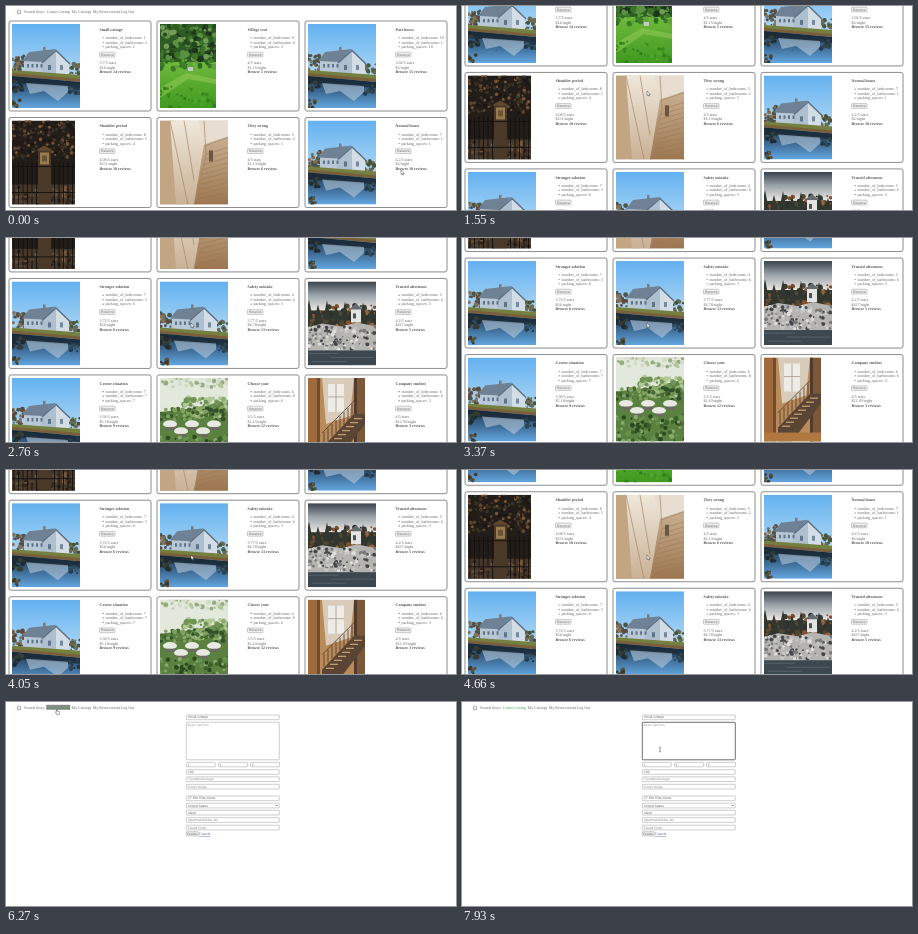
Recreate the animation shown at these times as an HTML page. Size 450 by 204 pixels, loop 8000 ms.

```html
<!DOCTYPE html>
<html lang="en">
<head>
<meta charset="utf-8">
<title>Stays</title>
<style>
  html, body { margin: 0; height: 100%; overflow: hidden; background: #fff; }
  svg { display: block; }
  #stage { width: 100vw; height: 100vh; }
  text { font: 4.08px "Liberation Serif", serif; fill: #666; text-rendering: geometricPrecision; }
  .bold { font-weight: bold; font-size: 4px; fill: #505050; }
  .ui { font: 3.33px "Liberation Sans", sans-serif; }
  .mono { font: 3.2px "Liberation Mono", monospace; }
  .hint { fill: #888; }
  .link { fill: #5a5ab4; text-decoration: underline; }
  .current { fill: #3fa84e; }
  .field { fill: #fff; stroke: #909090; stroke-width: .45; }
  .focused { stroke: #333; stroke-width: .7; }
  .button { fill: #eee; stroke: #888; stroke-width: .4; }
  .card { fill: #fff; stroke: #666; stroke-width: .75; }
</style>
</head>
<body>
<svg id="stage" viewBox="0 0 450 204">
  <defs>
    <linearGradient id="sky" x2="0" y2="1"><stop stop-color="#63b1f0"/><stop offset="1" stop-color="#b4dbf5"/></linearGradient>
    <linearGradient id="pond" x2="0" y2="1"><stop stop-color="#1f3448"/><stop offset=".5" stop-color="#3d6a93"/><stop offset="1" stop-color="#62a6e0"/></linearGradient>
    <linearGradient id="dusk" x2="0" y2="1"><stop stop-color="#39414a"/><stop offset=".45" stop-color="#98a2a9"/><stop offset="1" stop-color="#f2ece8"/></linearGradient>
    <linearGradient id="lawn" x2="0" y2="1"><stop stop-color="#6fb93c"/><stop offset="1" stop-color="#3f9a20"/></linearGradient>
    <linearGradient id="brick" x2="0" y2="1"><stop stop-color="#c9b091"/><stop offset="1" stop-color="#9c7650"/></linearGradient>
    <linearGradient id="cream" x2="0" y2="1"><stop stop-color="#efe7da"/><stop offset="1" stop-color="#c9b195"/></linearGradient>
  </defs>
  <g id="listings"></g>
  <g id="form"></g>
  <g id="cursor"></g>
</svg>
<script>
const DURATION = 8000, FORM_AT = 6270, FOCUS_AT = 7330;
const $ = id => document.getElementById(id);

let seed = 7;
const random = () => (seed = seed * 16807 % 2147483647) / 2147483647;
const repeat = (n, draw) => Array.from({ length: n }, (_, i) => draw(i)).join('');

const rect = (x, y, w, h, fill) => `<rect x="${x}" y="${y}" width="${w}" height="${h}" fill="${fill}"/>`;
const box = (x, y, w, h, cls, r = .7, id = '') =>
  `<rect id="${id}" x="${x}" y="${y}" width="${w}" height="${h}" rx="${r}" class="${cls}"/>`;
const poly = (points, fill, opacity = 1) => `<polygon points="${points}" fill="${fill}" opacity="${opacity}"/>`;
const line = (path, stroke, width) => `<path d="${path}" fill="none" stroke="${stroke}" stroke-width="${width}"/>`;
const text = (x, y, str, cls = '') => `<text x="${x}" y="${y}" class="${cls}">${str}</text>`;

// Scattered dots inside a box, for foliage and stone.
const scatter = (n, x, y, w, h, size, colors) => repeat(n, i =>
  `<circle cx="${(x + random() * w).toFixed(1)}" cy="${(y + random() * h).toFixed(1)}" r="${(size * (.5 + random())).toFixed(1)}" fill="${colors[i % colors.length]}"/>`);

const photos = {
  house: [68, 84, () =>
    rect(0, 0, 68, 56, 'url(#sky)') +
    scatter(26, 0, 31, 13, 16, 1.6, ['#5d4a3c', '#4b5749', '#85705a']) +
    scatter(16, 56, 40, 12, 10, 1.6, ['#46553a', '#6d6a54']) +
    poly('12,36 30,34 30,49 12,48', '#b9c8d6') + poly('29,38 44,27 57,39 57,52 29,50', '#aebfd0') +
    poly('44,27 57,39 57,52 44,51', '#d3dde6') + poly('10,37 17,28 44,25 31,38', '#6f8295') +
    line('M30 39L44 26.5L58 40', '#5d6f80', 1.4) + rect(31, 23, 2.5, 5, '#7d7a78') +
    repeat(4, i => rect(15 + i * 4.5, 40, 2, 3.5, '#5f7589')) + rect(36, 41, 3, 5, '#5f7589') + rect(48, 41, 3, 5, '#758a9c') +
    poly('0,46 68,51 68,57 0,50', '#74803f') + poly('0,49 68,55 68,58 0,52', '#7a5f3b') +
    poly('0,52 68,58 68,84 0,84', 'url(#pond)') + poly('0,52 68,58 68,64 0,59', '#16232e', .7) +
    poly('14,59 56,62 56,68 46,77 32,67 18,70', '#b4c8da', .6) +
    scatter(14, 0, 55, 11, 12, 1.7, ['#1f2b33', '#353c33']) + scatter(12, 57, 61, 11, 9, 1.6, ['#22384a', '#324851']) +
    scatter(9, 0, 76, 8, 8, 1.4, ['#3d3a2b', '#5a5138'])],
  garden: [56, 84, () =>
    rect(0, 0, 56, 84, '#2f5c25') + rect(0, 38, 56, 46, 'url(#lawn)') +
    scatter(150, 0, 0, 56, 36, 2.2, ['#25491f', '#3c7429', '#5b9140', '#1c361b', '#719c58']) +
    scatter(30, 0, 36, 56, 9, 2, ['#2e6822', '#5fa338', '#3c7c28']) +
    rect(28, 43, 5, 4, '#c4cbc3') + poly('0,64 26,49 56,55 56,60 28,55 0,74', '#99cc5b', .5) +
    scatter(40, 0, 62, 56, 22, 1.5, ['#378d1e', '#4fa82d', '#2f801b'])],
  gate: [63, 84, () =>
    rect(0, 0, 63, 84, '#231d19') +
    scatter(150, 0, 0, 63, 38, 1.3, ['#3c3022', '#171413', '#5e452d', '#39362a', '#7a5435']) +
    rect(0, 64, 63, 20, '#46372b') + scatter(50, 0, 66, 63, 18, 1.3, ['#664d36', '#2c221c', '#75593f']) +
    rect(26, 28, 13, 56, '#4a3829') + poly('24,30 32,25 41,30', '#614930') +
    rect(28, 32, 9, 12, '#987c50') + rect(30, 35, 5, 6, '#6b5334') +
    line(repeat(14, i => i > 5 && i < 9 ? '' : `M${2 + i * 4.5} 42V84`) + 'M0 46H63M0 72H63', '#14110f', .9)],
  wall: [68, 84, () =>
    rect(0, 0, 68, 84, 'url(#brick)') + poly('0,0 16,0 24,84 0,84', '#c2a684') +
    poly('10,0 44,0 47,34 36,84 16,84', 'url(#cream)') + poly('38,0 68,0 68,17 46,26', '#e7ddd0') +
    poly('44,24 68,16 68,84 34,84', 'url(#brick)') +
    line('M10 0L28 84M24 0L34 60M44 0L46 34L34 84M46 25L68 17', '#a5866a', .7) +
    line(repeat(10, i => `M${46 - i} ${34 + i * 5}L68 ${27 + i * 5}`), '#977552', .5) +
    rect(49, 30, 4, 11, '#6b5642')],
  cliff: [68, 84, () =>
    rect(0, 0, 68, 30, 'url(#dusk)') + rect(0, 29, 68, 18, '#33352d') +
    scatter(85, 0, 24, 68, 21, 1.9, ['#2c312a', '#4d4734', '#80502f', '#383d32', '#96633a']) +
    repeat(8, i => poly(`${i * 9 - 3},38 ${i * 9 + 1},${18 + i * 5 % 9} ${i * 9 + 5},38`, '#303630')) +
    rect(43, 27, 10, 14, '#e4e5e3') + poly('41,28 48,22 55,28', '#666c6e') + rect(45, 32, 3, 5, '#4a5355') +
    poly('0,46 14,42 34,45 49,41 68,45 68,72 0,72', '#b5b4b1') +
    scatter(130, 0, 45, 68, 23, 1.4, ['#dedddb', '#77787a', '#c6c5c2', '#45484b']) +
    rect(0, 69, 68, 15, '#3c4750') + line('M0 72H31M23 76H66M4 80H38', '#66747d', .6)],
  terrace: [68, 84, () =>
    rect(0, 0, 68, 84, '#5b8140') + poly('0,0 68,0 68,22 34,30 0,34', '#e3e8dc') +
    scatter(40, 0, 0, 68, 9, 1.8, ['#b3c7a1', '#93ad80', '#d2dcc8']) +
    scatter(70, 22, 20, 46, 19, 2, ['#8cad6a', '#b0c796', '#6f9354']) +
    scatter(60, 0, 30, 68, 12, 1.7, ['#486b34', '#7fa05f', '#33522a']) +
    repeat(5, i => `<ellipse cx="${10 + i * 11}" cy="${46 + i % 2 * 7}" rx="7" ry="3.6" fill="#e9e9e4"/>` + rect(6 + i * 11, 49 + i % 2 * 7, 9, 3, '#6c6a62')) +
    scatter(100, 0, 59, 68, 25, 1.8, ['#3b6229', '#65924a', '#294a20', '#8aa86c'])],
  stairs: [57, 84, () =>
    rect(0, 0, 57, 84, '#b98a5a') + rect(0, 0, 9, 84, '#a06a3c') + rect(9, 0, 3, 84, '#734b2e') +
    poly('14,0 46,0 42,38 18,46', '#d9cbb9') + rect(20, 6, 16, 28, '#eeece7') + line('M28 6V34M20 19H36', '#a99b89', .8) +
    rect(46, 0, 11, 84, '#7c583b') + rect(46, 0, 3, 84, '#523b2b') +
    poly('14,70 46,36 57,36 57,46 28,84 14,84', '#5a4433') +
    repeat(8, i => rect(18 + i * 4, 68 - i * 4, 8, 1.3, '#c29b6e')) +
    line(repeat(8, i => `M${16 + i * 4} ${67 - i * 4}v-13`) + 'M14 55L48 21', '#3f3128', .7) +
    rect(0, 75, 57, 9, '#b0783f')],
};

// title, photo, bedrooms, bathrooms, parking, stars, price, reviews
const listings = [
  ['Small cottage', 'house', 1, 2, 2, '3.7', '14', 14],
  ['Village seat', 'garden', 9, 0, 3, '4', '1.15', 5],
  ['Part house', 'house', 10, 1, 10, '3.92', '2', 15],
  ['Shoulder period', 'gate', 8, 5, 4, '4.08', '151', 18],
  ['They wrong', 'wall', 5, 2, 3, '4', '1.13', 6],
  ['Normal house', 'house', 7, 1, 1, '4.2', '2', 10],
  ['Stronger solution', 'house', 7, 3, 6, '3.72', '54', 6],
  ['Safety mistake', 'house', 4, 6, 3, '3.77', '4.78', 13],
  ['Trusted afternoon', 'cliff', 5, 6, 3, '4.2', '427', 5],
  ['Corner situation', 'house', 7, 7, 7, '3.38', '5.18', 9],
  ['Choose your', 'terrace', 6, 8, 6, '3.5', '1.43', 12],
  ['Company student', 'stairs', 6, 6, 3, '4', '12.93', 3],
];

function card([title, photo, beds, baths, parking, stars, price, reviews], i) {
  const x = 3 + i % 3 * 148, y = 15 + Math.floor(i / 3) * 96.5, left = x + 90.5;
  const [w, h, draw] = photos[photo];
  const facts = [`number_of_bedrooms: ${beds}`, `number_of_bathrooms: ${baths}`, `parking_spaces: ${parking}`];
  return box(x, y, 142, 90, 'card', 2) +
    `<svg x="${x + 3}" y="${y + 3}" width="${w}" height="${h}">${draw()}</svg>` +
    text(left, y + 9.7, title, 'bold') +
    facts.map((fact, n) => `<circle cx="${left + 3.6}" cy="${y + 16.7 + n * 4.5}" r=".55" fill="#555"/>` +
      text(left + 6, y + 18 + n * 4.5, fact)).join('') +
    box(left, y + 31.2, 15.5, 4.8, 'button') + text(left + 1.6, y + 34.8, 'Reserve', 'ui') +
    text(left, y + 43.4, `${stars}/5 stars`) + text(left, y + 47.9, `$${price}/night`) +
    text(left, y + 52.4, `Browse ${reviews} reviews`, 'bold');
}

// label, left edge, width
const navItems = [['Search', 18, 10.5], ['Stays', 29.7, 9], ['Create Listing', 40.7, 23], ['My Listings', 65.5, 19], ['My Reservations', 86.7, 26.5], ['Log Out', 114.7, 13]];
const nav = (page, current) => line('M10.8 5.6L13 3.5L15.2 5.6M11.5 5.2V7.6H14.5V5.2', '#555', .5) +
  `<rect id="${page}Hover" y="2.8" height="5" fill="#8b8b8b"/>` +
  navItems.map(([label, x]) => text(x, 6.6, label, label === current ? 'current' : '')).join('');

const field = (y, value, cls = 'hint', h = 4.7) => box(180.3, y, 93, h, 'field') + text(182, y + 3.4, value, 'ui ' + cls);

$('listings').innerHTML = nav('listings') + listings.map(card).join('');
$('form').innerHTML = rect(0, 0, 450, 204, '#fff') + nav('form', 'Create Listing') +
  field(13, 'Small cottage', '') +
  box(180.3, 20.3, 93, 37.5, 'field', .7, 'description') + text(181.6, 24, 'Description', 'mono hint') +
  [180.3, 212.5, 244.5].map((x, i) => box(x, 60.4, 29, 4.4, 'field') + text(x + 1.3, 63.7, [1, 1, 2][i], 'ui')).join('') +
  field(67.6, '100', '') + field(74.8, 'Thumbnail image') + field(82.3, 'Cover image') +
  field(94, '27 Elm Rise street', '') + field(101.2, 'United States', '') + line('M269.7 102.9L270.8 104L271.9 102.9', '#222', .5) +
  field(108.3, 'Idaho', '') + field(115.7, 'Apartment/Suite, etc') + field(123.2, 'Postal Code') +
  box(180.3, 129.7, 12, 4.3, 'button') + text(181.2, 133, 'Create', 'ui') + text(193, 133.1, 'Cancel', 'link');

const pointers = {
  arrow: '<path d="M0 0V4.6L1.1 3.6L1.9 5.2L2.6 4.9L1.9 3.4H3.3Z" fill="#fff" stroke="#222" stroke-width=".4"/>',
  hand: '<path d="M-.5 0V2.6L-1.6 2.2L-.5 4.9H2.2L2.6 2.2L.5 1.6V0Z" fill="#fff" stroke="#222" stroke-width=".4"/>',
  beam: line('M-.8 -2.2H.8M0 -2.2V2.2M-.8 2.2H.8', '#333', .5),
};

// Each key is [time, ...values].
const scrollKeys = [[520, 0], [1270, 30], [1550, 45], [2090, 95], [2760, 167.5], [2950, 181], [3180, 181], [3510, 193],
  [3850, 193], [4050, 178], [4460, 97], [4600, 97], [4660, 90], [5010, 0]];
const cursorKeys = [[30, 395, 164], [200, 267, 128], [520, 267, 128], [1100, 185, 85], [5150, 185, 85], [5700, 35, 6],
  [5980, 50, 7], [6130, 51, 7.5], [6620, 51, 7.5], [7400, 207, 28], [7800, 207, 28], [7930, 198, 47.5]];

function at(keys, t) {
  const next = keys.findIndex(key => key[0] > t);
  if (next < 1) return keys.at(next).slice(1);
  const a = keys[next - 1], b = keys[next], p = (t - a[0]) / (b[0] - a[0]);
  return a.slice(1).map((v, i) => v + (b[i + 1] - v) * p);
}

function render(now) {
  const t = now % DURATION, onForm = t >= FORM_AT;
  const [scroll] = at(scrollKeys, t), [x, y] = at(cursorKeys, t);
  const hovered = y < 8.5 && navItems.find(([, left, w]) => x >= left && x <= left + w);
  const inField = onForm && x > 180 && x < 273 && y > 20 && y < 58;

  $('listings').setAttribute('transform', `translate(0 ${-scroll})`);
  $('form').style.display = onForm ? '' : 'none';
  const highlight = $(onForm ? 'formHover' : 'listingsHover');
  highlight.setAttribute('x', hovered ? hovered[1] - .5 : 0);
  highlight.setAttribute('width', hovered ? hovered[2] + 1 : 0);
  $('description').classList.toggle('focused', t >= FOCUS_AT);
  $('cursor').innerHTML = pointers[hovered ? 'hand' : inField ? 'beam' : 'arrow'];
  $('cursor').setAttribute('transform', `translate(${x} ${y})`);
  requestAnimationFrame(render);
}
requestAnimationFrame(render);
</script>
</body>
</html>
```
